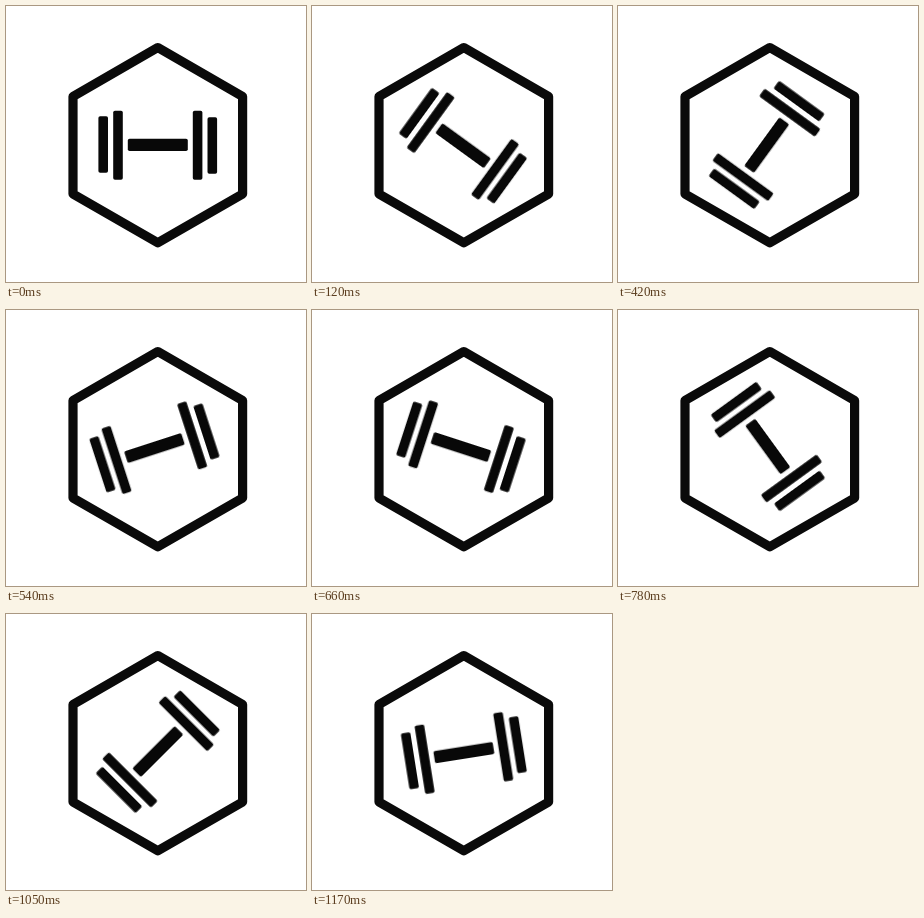
Animation, 300 px wide and 276 px high, one loop 1.2 s. Source, as an HTML page:

```html
<!DOCTYPE html>
<html lang="en">
<head>
<meta charset="utf-8">
<title>Spinning dumbbell</title>
<style>
  html, body {
    margin: 0;
    width: 100%;
    height: 100%;
    overflow: hidden;
    background: #fff;
  }
  svg {
    display: block;
    width: 300px;
    height: 276px;
  }
  .frame {
    fill: none;
    stroke: #0a0a0a;
    stroke-width: 9.2;
    stroke-linejoin: round;
  }
  .dumbbell {
    fill: #080808;
    transform-origin: 150.2px 138.2px;
    animation: spin 1200ms steps(40, end) infinite;
  }
  @keyframes spin {
    from { transform: rotate(0deg); }
    to { transform: rotate(360deg); }
  }
</style>
</head>
<body>
<svg viewBox="0 0 300 276">
  <path class="frame" d="M151.8 41.6 L236.6 90.4 V188 L151.8 236.8 L67 188 V90.4 Z"/>
  <g class="dumbbell">
    <rect x="92.4" y="110.2" width="9.6" height="56.6" rx="1.8"/>
    <rect x="107.2" y="104.7" width="9.6" height="69" rx="1.8"/>
    <rect x="121.8" y="132.8" width="60" height="12.2" rx="1.8"/>
    <rect x="186.8" y="104.7" width="9.6" height="69" rx="1.8"/>
    <rect x="201.5" y="111.2" width="9.6" height="56.6" rx="1.8"/>
  </g>
</svg>
</body>
</html>
```
